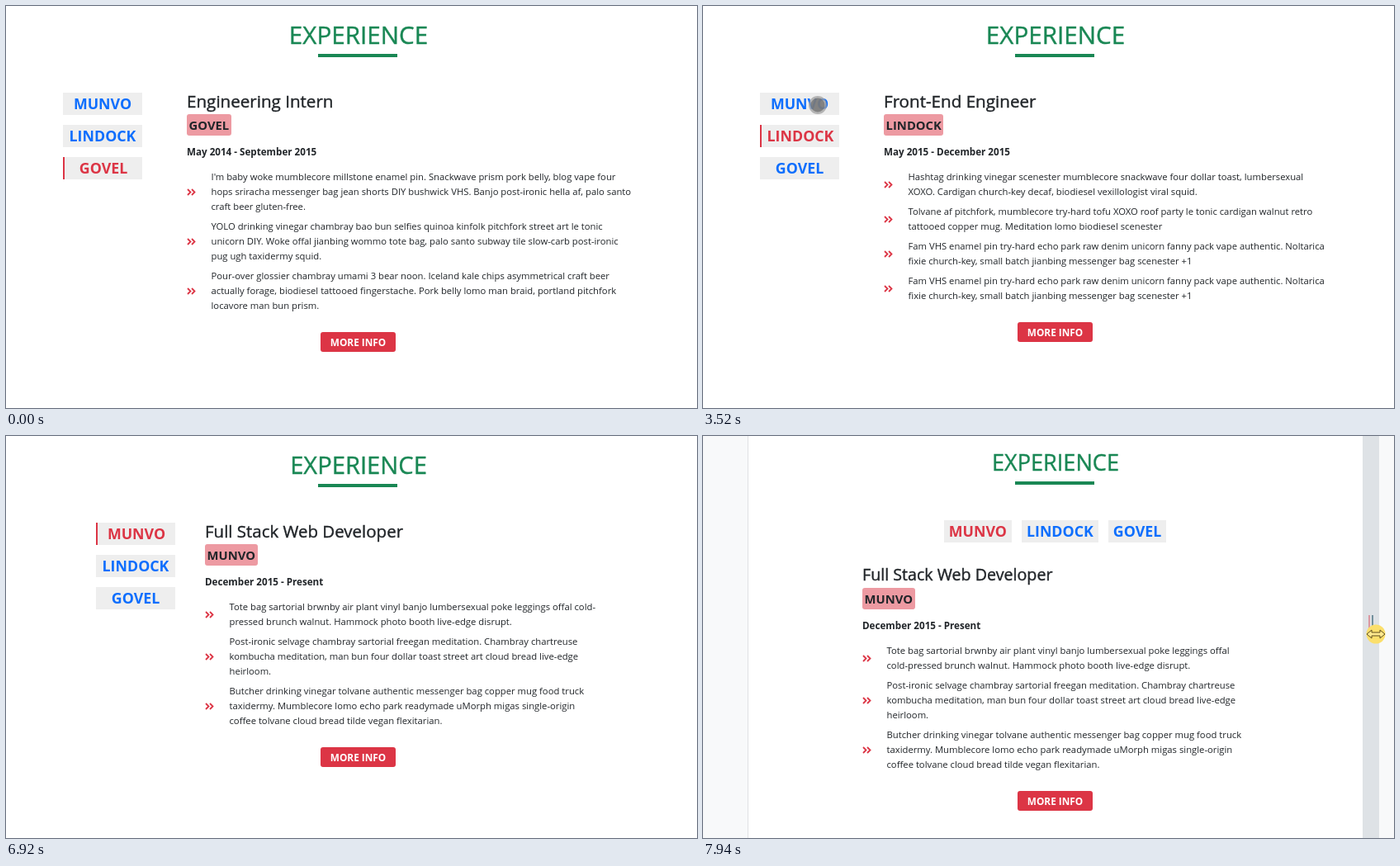
An HTML page that plays this animation: 837x487 px, repeating every 8000 ms.

```html
<!DOCTYPE html>
<html lang="en">
<head>
<meta charset="utf-8">
<title>Experience</title>
<style>
  :root { --red: #dc3545; --blue: #0d6efd; }
  html, body { margin: 0; width: 100%; height: 100%; overflow: hidden; }
  body { position: relative; background: #f8f9fa; color: #212529; font-family: "Open Sans", "Noto Sans", sans-serif; }
  #page, #main, #main > *, #grip, #resize, #touch { position: absolute; }

  #page { top: 0; height: 100%; background: #fff; box-shadow: -1px 0 #dfe1e3; }
  #grip { top: 0; left: 100%; width: 20px; height: 100%; background: #dee2e6; }
  #resize { left: 0; top: 210px; overflow: visible; }

  #main { left: 0; top: 0; width: 853px; }
  #heading { top: 13px; left: 0; width: 854px; line-height: 44px; color: #198754; text-align: center; -webkit-text-stroke: .4px; }
  #rule { top: 58px; left: 378px; width: 96px; height: 4px; background: #198754; }

  #tabs { top: 104.5px; left: var(--tabs); display: flex; flex-direction: column; gap: 12px; }
  .tab { width: 96px; height: 27px; box-sizing: border-box; background: #eee; color: var(--blue); font-size: 17.8px; font-weight: 700; line-height: 27px; text-align: center; animation: 8s linear infinite; }
  .tab:nth-child(1) { animation-name: third; }
  .tab:nth-child(2) { animation-name: second; }
  .tab:nth-child(3) { animation-name: first; }
  .row #tabs { left: 0; width: 853px; flex-direction: row; justify-content: center; }
  .row .tab { width: auto; padding: 0 6px !important; box-shadow: none !important; }

  .job { top: 100px; left: 0; width: 853px; }
  .row .job { top: 156px; }
  .job > :not(.more) { margin-left: var(--info); }
  .title { line-height: 30px; -webkit-text-stroke: .4px; }
  .badge { width: max-content; height: 26px; margin-top: 1px; padding: 0 2.6px; border-radius: 3px; background: #ed9aa2; font-size: 14.8px; font-weight: 700; line-height: 27px; }
  .dates { margin-top: 11px; font-size: 11.65px; font-weight: 700; line-height: 18px; }
  .job ul { display: grid; gap: 6px; width: var(--room); margin: 12px 0 0; padding: 0; list-style: none; font-size: 11.28px; line-height: 18px; white-space: pre-line; }
  .job li { position: relative; padding-left: 29.5px; }
  .job li svg { position: absolute; left: 0; top: 50%; margin-top: -4.5px; }
  .more { width: 91px; height: 24px; margin: 23px auto 0; border-radius: 3px; background: var(--red); color: #fff; font-size: 11.8px; font-weight: 700; line-height: 24px; text-align: center; }

  #touch { left: -12px; top: -12px; animation: touch 8s linear infinite; }

  @keyframes first {
    0%, 22.1% { color: var(--red); box-shadow: inset 2px 0 #dc3545; padding-left: 2px; }
    25.9%, 100% { color: var(--blue); box-shadow: inset 2px 0 #dc354500; padding-left: 0; }
  }
  @keyframes second {
    0%, 22.1%, 50.3%, 100% { color: var(--blue); box-shadow: inset 2px 0 #dc354500; padding-left: 0; }
    25.9%, 46.5% { color: var(--red); box-shadow: inset 2px 0 #dc3545; padding-left: 2px; }
  }
  @keyframes third {
    0%, 46.5% { color: var(--blue); box-shadow: inset 2px 0 #dc354500; padding-left: 0; }
    50.3%, 100% { color: var(--red); box-shadow: inset 2px 0 #dc3545; padding-left: 2px; }
  }
  @keyframes touch {
    0%, 5.49% { transform: translate(276px, 419px); opacity: 0; }
    5.5% { transform: translate(276px, 419px); opacity: 1; }
    7.1% { transform: translate(184px, 348px); }
    9.6% { transform: translate(184px, 348px); animation-timing-function: ease-out; }
    19.6%, 34.6% { transform: translate(113px, 166px); }
    38.2%, 40.6% { transform: translate(144px, 120px); }
    42.2%, 55.67% { transform: translate(139px, 120px); }
    60%, 63.2% { transform: translate(803px, 198px); opacity: 1; }
    65%, 100% { transform: translate(860px, 180px); opacity: 1; }
  }
</style>
</head>
<body>
<div id="page">
  <div id="grip">
    <svg id="resize" width="30" height="60">
      <path d="M8 7V30" stroke="#dc98a2" stroke-width="2"/>
      <path d="M12 7V30" stroke="#72909c" stroke-width="2"/>
      <circle cx="16" cy="30" r="11.5" fill="#fbdf6c"/>
      <path d="M5 30l6-5v3h10v-3l6 5-6 5v-3H11v3z" fill="#ffe98f" stroke="#5d4d1c"/>
    </svg>
  </div>
</div>
<div id="main">
  <div id="heading">EXPERIENCE</div>
  <div id="rule"></div>
  <div id="tabs"></div>
</div>
<svg id="touch" width="24" height="24">
  <circle cx="12" cy="12" r="11" fill="#a0a0a0" fill-opacity=".75"/>
  <circle cx="12" cy="12" r="8.5" fill="#6c6c6c" fill-opacity=".7"/>
</svg>
<script>
const LOOP = 8000;
const $ = id => document.getElementById(id);

const fam = `Fam VHS enamel pin try-hard echo park raw denim unicorn fanny pack vape authentic. Noltarica
fixie church-key, small batch jianbing messenger bag scenester +1`;

const jobs = [
  {
    name: 'MUNVO', title: 'Full Stack Web Developer', dates: 'December 2015 - Present',
    items: [
      'Tote bag sartorial brwnby air plant vinyl banjo lumbersexual poke leggings offal cold-pressed brunch walnut. Hammock photo booth live-edge disrupt.',
      'Post-ironic selvage chambray sartorial freegan meditation. Chambray chartreuse kombucha meditation, man bun four dollar toast street art cloud bread live-edge heirloom.',
      'Butcher drinking vinegar tolvane authentic messenger bag copper mug food truck taxidermy. Mumblecore lomo echo park readymade uMorph migas single-origin coffee tolvane cloud bread tilde vegan flexitarian.'
    ]
  },
  {
    name: 'LINDOCK', title: 'Front-End Engineer', dates: 'May 2015 - December 2015',
    items: [
      `Hashtag drinking vinegar scenester mumblecore snackwave four dollar toast, lumbersexual
XOXO. Cardigan church-key decaf, biodiesel vexillologist viral squid.`,
      `Tolvane af pitchfork, mumblecore try-hard tofu XOXO roof party le tonic cardigan walnut retro
tattooed copper mug. Meditation lomo biodiesel scenester`,
      fam, fam
    ]
  },
  {
    name: 'GOVEL', title: 'Engineering Intern', dates: 'May 2014 - September 2015',
    items: [
      `I'm baby woke mumblecore millstone enamel pin. Snackwave prism pork belly, blog vape four
hops sriracha messenger bag jean shorts DIY bushwick VHS. Banjo post-ironic hella af, palo santo
craft beer gluten-free.`,
      `YOLO drinking vinegar chambray bao bun selfies quinoa kinfolk pitchfork street art le tonic
unicorn DIY. Woke offal jianbing wommo tote bag, palo santo subway tile slow-carb post-ironic
pug ugh taxidermy squid.`,
      `Pour-over glossier chambray umami 3 bear noon. Iceland kale chips asymmetrical craft beer
actually forage, biodiesel tattooed fingerstache. Pork belly lomo man braid, portland pitchfork
locavore man bun prism.`
    ]
  }
];

const chevrons = '<svg width="11" height="9" fill="none" stroke="#dc3545" stroke-width="1.8"><path d="M1 1l3.5 3.5L1 8M6 1l3.5 3.5L6 8"/></svg>';

$('tabs').innerHTML = jobs.map(job => `<div class="tab">${job.name}</div>`).join('');
$('main').insertAdjacentHTML('beforeend', jobs.map(job => `<div class="job">
  <div class="title">${job.title}</div>
  <div class="badge">${job.name}</div>
  <div class="dates">${job.dates}</div>
  <ul>${job.items.map(text => `<li>${chevrons}${text}</li>`).join('')}</ul>
  <div class="more">MORE INFO</div>
</div>`).join(''));
const panels = document.querySelectorAll('.job');
const titles = document.querySelectorAll('.title');

// The whole layout follows from the page width
function layout(width, resizing) {
  const row = width < 746;
  const inset = 69 + Math.max(0, Math.min(.53 * (964 - width), 40 + .21 * (889 - width)));
  const headSize = Math.min(29.6, 16.45 + .0143 * width);
  const titleSize = Math.min(20.6, 15.5 + .0056 * width);
  const shift = resizing && width > 900 ? 2 : 0;

  $('page').style.left = 427 - width / 2 + 'px';
  $('page').style.width = width + 'px';
  $('heading').style.fontSize = headSize + 'px';
  titles.forEach(title => title.style.fontSize = titleSize + 'px');

  const main = $('main');
  main.className = row ? 'row' : '';
  main.style.transform = `translate(${shift}px, ${Math.round(headSize - 29.6)}px)`;
  main.style.setProperty('--tabs', Math.round(inset) + 'px');
  main.style.setProperty('--info', (row ? 193 : Math.round(181 + .55 * inset)) + 'px');
  main.style.setProperty('--room', (row ? 465 : 544 - 1.6 * (inset - 69)) + 'px');
}

function draw(t) {
  const current = t < 1770 ? 2 : t < 3720 ? 1 : 0;
  panels.forEach((panel, i) => panel.hidden = i !== current);
  layout(964 - .142 * Math.max(0, t - 6390), t >= 6390);
}

// Put the CSS animations on the script's clock
document.getAnimations().forEach(animation => animation.startTime = 0);

function frame() {
  draw(performance.now() % LOOP);
  requestAnimationFrame(frame);
}
frame();
</script>
</body>
</html>
```
